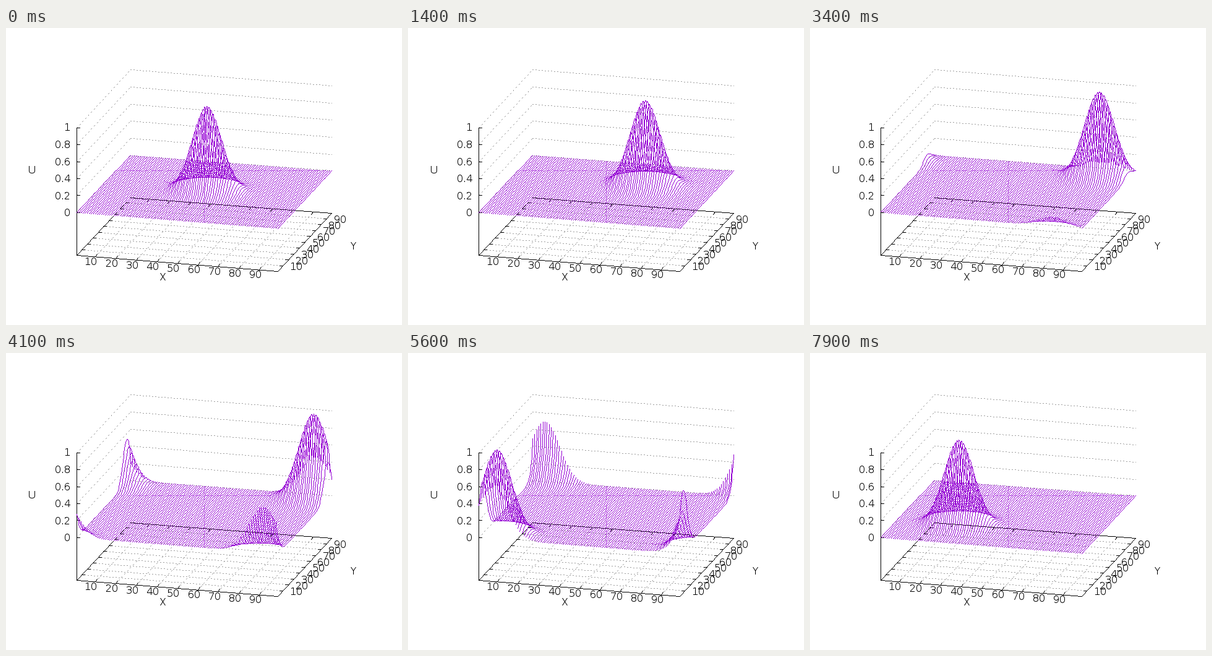
Write a matplotlib script that moves like this. It is 640x480 px and loops after 8 s.

```python
import numpy as np
import matplotlib as mpl
import matplotlib.pyplot as plt
from matplotlib.animation import FuncAnimation

mpl.rcParams["text.hinting"] = "native"
mpl.rcParams["text.hinting_factor"] = 1
mpl.rcParams["font.family"] = "DejaVu Sans"

W, H, DPI = 640, 480, 80
N = 99                      # grid points per side, indices 1..N
FRAMES, STEP_MS = 80, 100
CENTER, WIDTH = 51, 10      # starting place and width of the bump

VIOLET, BLACK, GREY = (148, 0, 211), (0, 0, 0), (160, 160, 160)
MID_X, MID_Y = 320, 230


def project(x, y, z):
    """Orthographic projection to float pixel offsets from the middle."""
    u = 2 * (np.asarray(x) - 1) / (N - 1) - 1
    v = 2 * (np.asarray(y) - 1) / (N - 1) - 1
    w = (np.asarray(z) - 0.25) / 0.75
    return 163.0 * u + 43.6 * v, 12.8 * u - 46.7 * v - 103.55 * w


def to_pixel(dx, dy):
    """Truncate towards the middle, as a plotting terminal does."""
    return MID_X + np.trunc(dx).astype(int), MID_Y + np.trunc(dy).astype(int)


def segments(img, x0, y0, x1, y1, color, dash=None):
    """Draw one-pixel aliased segments, all at once."""
    dx, dy = x1 - x0, y1 - y0
    n = np.maximum(np.abs(dx), np.abs(dy))
    safe = np.maximum(n, 1)
    for k in range(int(n.max()) + 1):
        if dash and k % dash[1] >= dash[0]:
            continue
        t = np.minimum(k, n) / safe
        px = np.floor(x0 + dx * t + 0.5).astype(int)
        py = np.floor(y0 + dy * t + 0.5).astype(int)
        img[py, px] = color


def line(img, p, q, color=BLACK, dash=None):
    x0, y0 = to_pixel(*project(*p))
    x1, y1 = to_pixel(*project(*q))
    segments(img, x0, y0, x1, y1, color, dash)


def tick(img, p, dx, dy):
    x0, y0 = to_pixel(*project(*p))
    segments(img, x0, y0, np.int64(x0 + dx), np.int64(y0 + dy), BLACK)


def label(x, y, s):
    fig.text(x / W, 1 - y / H, s, fontsize=16 * 72 / DPI,
             ha="left", va="baseline", color="black")


def screen(*p):
    dx, dy = project(*p)
    return MID_X + dx, MID_Y + dy


FLOOR = -0.5
TENS = range(10, 100, 10)
LEVELS = [k / 5 for k in range(6)]


def draw_box():
    img = np.full((H, W, 3), 255, np.uint8)
    dots = dict(color=GREY, dash=(2, 5))
    for t in TENS:
        line(img, (t, 1, FLOOR), (t, N, FLOOR), **dots)
        line(img, (1, t, FLOOR), (N, t, FLOOR), **dots)
    for z in LEVELS:
        line(img, (1, 1, z), (1, N, z), **dots)
        line(img, (1, N, z), (N, N, z), **dots)

    corners = [(1, 1), (N, 1), (N, N), (1, N)]
    for a, b in zip(corners, corners[1:] + corners[:1]):
        line(img, (*a, FLOOR), (*b, FLOOR))
    line(img, (1, 1, FLOOR), (1, 1, 1))

    for t in TENS:
        tick(img, (t, 1, FLOOR), 3, -4)
        tick(img, (t, N, FLOOR), -3, 4)
        tick(img, (1, t, FLOOR), 5, 0)
        tick(img, (N, t, FLOOR), -5, 0)
    for z in LEVELS:
        tick(img, (1, 1, z), 5, 0)
    return img


def draw_labels():
    for t in TENS:
        x, y = screen(t, 1, FLOOR)
        label(x - 16, y + 13.6, str(t))
        x, y = screen(N, t, FLOOR)
        label(x + 11.5, y + 7, str(t))
    for z in LEVELS:
        s = f"{z:g}"
        label(94 if len(s) == 1 else 79, screen(1, 1, z)[1] + 6, s)
    label(248, 408, "X")
    label(557, 358, "Y")
    label(36, 235, "U")


idx = np.arange(1, N + 1)
GX, GY = np.meshgrid(idx, idx, indexing="ij")


def bump(n):
    """Gaussian moved by n cells along both periodic axes."""
    d = (idx - CENTER - n + N / 2) % N - N / 2
    g = np.exp(-(d / WIDTH) ** 2)
    return np.outer(g, g)


def field(n):
    """Moving bump; the far edges copy the near ones a step late."""
    u, late = bump(n), bump(n - 1)
    u[-1, :] = late[0, :]
    u[:, -1] = late[:, 0]
    u[-1, -1] = late[0, 0]
    return u


def render(n):
    px, py = to_pixel(*project(GX, GY, field(n)))
    img = box.copy()
    segments(img, px[:, :-1], py[:, :-1], px[:, 1:], py[:, 1:], VIOLET)
    return img


fig = plt.figure(figsize=(W / DPI, H / DPI), dpi=DPI, facecolor="white")
ax = fig.add_axes([0, 0, 1, 1])
ax.axis("off")
box = draw_box()
draw_labels()
picture = ax.imshow(render(0), interpolation="nearest", aspect="auto")


def update(n):
    picture.set_data(render(n))
    return [picture]


anim = FuncAnimation(fig, update, frames=FRAMES, interval=STEP_MS,
                     repeat=True, repeat_delay=0, blit=False)
plt.show()
```
